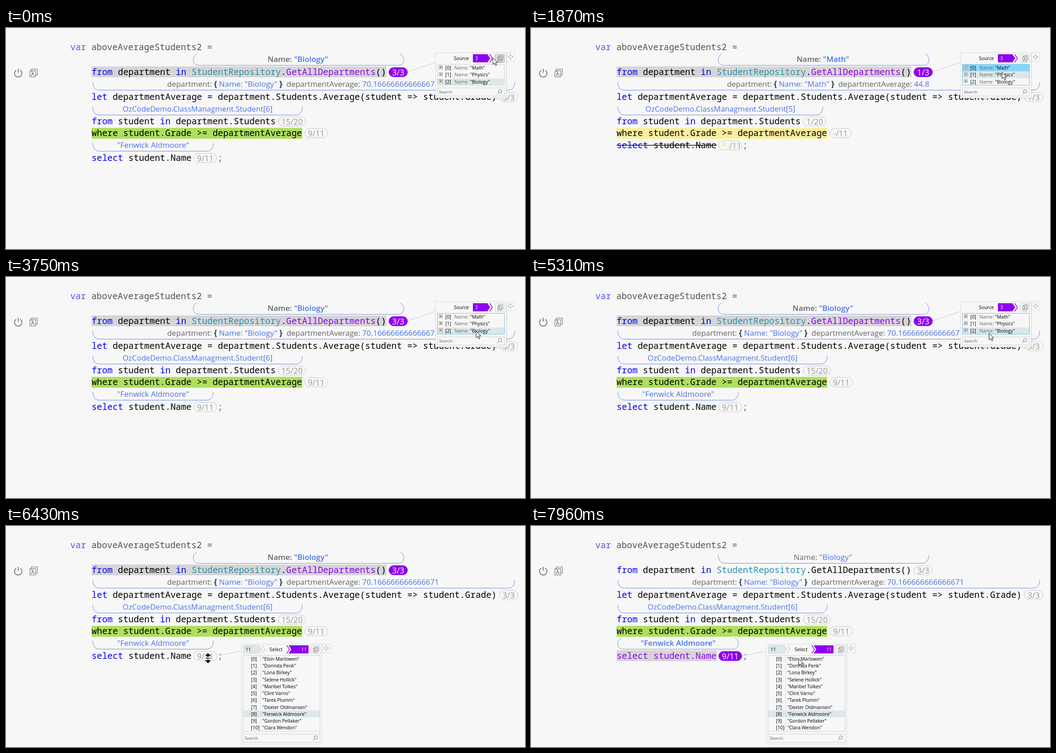
An HTML page that plays this animation: 1146x489 px, repeating every 7.99 s.

```html
<!DOCTYPE html>
<html lang="en">
<head>
<meta charset="utf-8">
<title>Query debugger</title>
<style>
html, body { margin: 0; width: 100%; height: 100%; overflow: hidden; background: #f7f7f7; }
svg { display: block; width: 1146px; height: 489px; }
text { white-space: pre; font-family: "Open Sans", "Noto Sans", sans-serif; }
.code { font: 19.37px "Noto Sans Mono", monospace; fill: #000; }
.strong { font-weight: 700; }
.semi { font-weight: 600; }
.small { font-size: 10.4px; fill: #000; }
.search { font-size: 9.6px; font-style: italic; fill: #666; }
.key { fill: #0000f0; }
.type { fill: #2b91af; }
.dim { fill: #666; }
.value { fill: #4a72ea; }
.brace { fill: #223c48; font-weight: 700; }
.purple { fill: #9000f0; }
.light { fill: #fff; }
</style>
</head>
<body>
<svg viewBox="0 0 1146 489"><g id="query"></g><g id="source"></g><g id="select"></g><g id="pointer"></g></svg>
<script>
const LOOP = 7990, PURPLE = '#9000f0', PALE = '#dde7e9', PAPER = '#f7f7f7';
const DEPARTMENTS = [
  { name: 'Math', average: '44.8', count: 5, student: '1/20', where: '-/11' },
  { name: 'Physics', average: '45.444444444444443', count: 9, student: '6/20', where: '3/11', picked: 'Lona Birkey' },
  { name: 'Biology', average: '70.166666666666671', count: 6, student: '15/20', where: '9/11', picked: 'Fenwick Aldmoore' }
];
const STUDENTS = ['Elsin Marlowen', 'Dorinda Penk', 'Lona Birkey', 'Selene Hollick', 'Maribel Tolkes', 'Clint Varno',
  'Tarek Plumm', 'Dexter Oldmansen', 'Fenwick Aldmoore', 'Gordon Pellaker', 'Clara Wendon'];
// time, x, y
const PATH = [[0, 1075, 66], [30, 1075, 66], [430, 1040, 88], [1720, 1040, 88], [1930, 1040, 100], [2860, 1040, 100],
  [3220, 1038, 120], [5280, 1038, 120], [5500, 850, 152], [5790, 562, 265], [6060, 446, 292], [7630, 446, 292],
  [7960, 591, 294], [LOOP, 591, 294]];

const layer = id => document.getElementById(id);
const clamp = v => Math.max(0, Math.min(1, v));
const step = (t, times) => times.filter(at => t >= at).length;

const span = (s, cls = '') => `<tspan class="${cls}">${s}</tspan>`;
const text = (x, y, body, cls = '', attrs = '') => `<text x="${x}" y="${y}" class="${cls}" ${attrs}>${body}</text>`;
const rect = (x, y, w, h, fill, stroke = 'none', r = 0) =>
  `<rect x="${x}" y="${y}" width="${w}" height="${h}" rx="${r}" fill="${fill}" stroke="${stroke}"/>`;
const path = (d, stroke, fill = 'none', width = 1) =>
  `<path d="${d}" stroke="${stroke}" fill="${fill}" stroke-width="${width}"/>`;
const code = (y, body, cls = '', x = 189) => text(x, y, body, 'code ' + cls);
const label = (x, y, body, cls = 'value', size = 17) => text(x, y, body, cls, `font-size="${size}" text-anchor="middle"`);

function bracket(x1, x2, bottom, active) {
  const y = bottom + .5;
  return active
    ? path(`M${x1 + 8} ${y - 25}Q${x1} ${y - 21} ${x1} ${y - 12}Q${x1} ${y} ${x1 + 13} ${y}H${x2 - 13}
        Q${x2} ${y} ${x2} ${y - 12}Q${x2} ${y - 21} ${x2 - 8} ${y - 25}`, '#7690e0')
    : path(`M${x1} ${y - 18}Q${x1 + 1} ${y} ${x1 + 14} ${y}H${x2 - 14}Q${x2 - 1} ${y} ${x2} ${y - 18}`, '#6384ea');
}

function pill(x, y, w, body, active) {
  return rect(x + .5, y + .5, w - 1, 20.5, active ? PURPLE : PAPER, active ? PURPLE : '#c6c6c6', 10.2) +
    text(x + w / 2, y + 18, body, '', `font-size="17.8" text-anchor="middle" fill="${active ? '#fff' : '#999'}"`);
}

function lambda(x, y, k, color) {
  return `<g transform="translate(${x} ${y}) scale(${k})" fill="none" stroke="${color}" stroke-width="1.3">
    <path d="M4 4V.7H17.3V14H14M.7 4.5H13.5V18.3H.7Z"/>
    <path d="M3.5 6.5H5.5L10.5 16M7.2 9.5L3.5 16" stroke-width="1.7"/></g>`;
}

function drawSelectLine(d, active) {
  const y = d.picked ? 294 : 266;
  const line = code(y, active ? span('select student.Name', 'purple') : span('select', 'key') + ' student.Name') +
    code(y, span(';', 'dim'), '', 467);
  if (!d.picked) {
    return line + pill(414, y - 17, 52, '<tspan dx="11">/11</tspan>') + path('M189 259.5H410', '#111', 'none', 1.4) +
      path('M421.5 258a4 4 0 1 0 8 0a4 4 0 1 0 -8 0M422.7 261L428.3 255', '#f3e37a', 'none', 1.3);
  }
  return bracket(191.5, 458, 272, active) + label(325, 265, `"${d.picked}"`, active ? 'value semi' : 'value') +
    (active ? rect(189, 275, 221, 24, '#d5d5d5') : '') + line + pill(414, y - 17, 52, d.where, active);
}

function drawQuery(s) {
  const d = DEPARTMENTS[s.dept], n = `${s.dept + 1}/3`, top = !s.selectActive;
  const name = span('Name: ', 'dim') + span(`"${d.name}"`, 'value');
  const studentEnd = d.student.length > 4 ? 662 : 652;
  return [
    `<g opacity=".66">${code(49, span('var', 'key') + ' aboveAverageStudents2 =', '', 142)}</g>`,
    path('M22.5 93.5A8.2 8.2 0 1 0 31.5 93.5M27 90V99', '#858585', 'none', 2),
    lambda(52, 90, 1, '#858585'),
    bracket(413.5, 878.5, 82, top),
    label(644.5, 75, name, top ? 'semi' : ''),
    top ? rect(189, 85, 651, 24, '#d5d5d5') : '',
    code(104, span('from', 'key') + ' department ' + span('in', 'key') + ' ' + span('StudentRepository', 'type') + '.' +
      span('GetAllDepartments', top ? 'purple' : '') + '()'),
    pill(845, 87, 42, n, top),
    bracket(191.5, 1123.5, 137),
    label(656, 130, span('department: ', 'dim') + span('{', 'brace') + span(` Name: "${d.name}" `, 'value') +
      span('}', 'brace') + span('  departmentAverage: ', 'dim') + span(d.average, 'value')),
    s.letHover ? rect(189, 140, 895, 24, '#dfe8ea') : '',
    code(159, span('let', 'key') + ' departmentAverage = department.Students.Average(student => student.Grade)',
      s.letHover ? 'strong' : ''),
    pill(1089, 142, 42, n),
    bracket(191.5, studentEnd - 7.5, 192),
    label((studentEnd + 184) / 2, 185, `OzCodeDemo.ClassManagment.Student[${d.count}]`, 'value', 16.65),
    code(213, span('from', 'key') + ' student ' + span('in', 'key') + ' department.Students'),
    pill(601, 196, studentEnd - 601, d.student),
    rect(189, 221, 465, 24, d.picked ? '#aedf5e' : '#fbee9e'),
    code(239, 'where student.Grade >= departmentAverage'),
    pill(659, 222, d.picked ? 52 : 49, d.where),
    drawSelectLine(d, s.selectActive)
  ].join('');
}

const lambdaButton = (x, y, hover) => rect(x + .5, y + .5, 20, 18, hover ? '#ddd' : PAPER, hover ? '#aaa' : '#d2d2d2') +
  lambda(x + 5, y + 3, .7, '#777');

const handle = (x, y) => rect(x + .5, y + .5, 18, 20, PAPER, '#ddd') +
  [0, 90, 180, 270].map(a => `<path d="M0 -5.5L2 -3H-2Z" fill="#888" transform="translate(${x + 9} ${y + 10}) rotate(${a})"/>`).join('');

const searchBox = (x, y, w) => rect(x + .5, y + .5, w, 18, PAPER, '#d2d2d2') + text(x + 4, y + 13, 'Search:', 'search') +
  `<circle cx="${x + w - 9}" cy="${y + 8}" r="3.7" fill="none" stroke="#777"/>` +
  path(`M${x + w - 12} ${y + 11}l-3.5 3.5`, '#777');

const chevron = (x, y, color) => path(`M${x} ${y}l6 9l-6 9`, color, 'none', 1.4);

function drawSource(s) {
  const rows = DEPARTMENTS.map((d, i) => {
    const y = 81 + i * 15.3;
    const fill = s.row === i ? PALE : s.dept !== i ? 'none' : s.focus ? '#87d5f7' : PALE;
    return rect(953, y, 148, 15, fill) + rect(956.5, y + 2.5, 7, 7, '#fff', '#888') +
      path(`M958 ${y + 6}h4m-2 -2v4`, '#222') + text(970, y + 11, `[${i}]`, 'small') +
      text(990, y + 11, span('Name: ', 'dim') + `"${d.name}"`, 'small');
  }).join('');
  return path('M887 97L948 76', '#c8c8c8') + rect(950, 57, 157, 101, 'rgba(0,0,0,.04)') +
    rect(948.5, 54.5, 156, 100, PAPER, '#dcdcdc') + (s.handle ? handle(1105, 54) : '') +
    text(989, 71, 'Source', 'small') + path('M1031 58H1063L1069 67L1063 76H1031Z', 'none', PURPLE) +
    chevron(1068, 58, PURPLE) + text(1036, 71, '3', 'small light') + lambdaButton(1080, 58, s.buttonHover) +
    rows + path('M986.5 81V127', '#dce8ec') +
    rect(952.5, 80.5, 148, 46, 'none', s.focus ? '#68c4ec' : '#d2d2d2') + searchBox(952, 132, 148);
}

function drawSelect() {
  const rows = STUDENTS.map((name, i) => {
    const y = 298 + i * 15.24;
    return (i === 8 ? rect(524, y - 12, 169, 15.2, PALE) : '') +
      text(541, y, `[${i}]`, 'small') + text(566, y, `"${name}"`, 'small');
  }).join('');
  return path('M467 287L519 277', '#c8c8c8') + rect(519.5, 261.5, 178, 221, PAPER, '#dcdcdc') + handle(698, 260) +
    path('M524.5 264.5H559L565 273L559 281.5H524.5Z', '#c6d0d2', PALE) + chevron(566, 264, '#ccd5d7') +
    text(529, 277, '11', 'small') + text(582, 277, 'Select', 'small') +
    chevron(620, 264, PURPLE) + path('M624 264H668V282H624L630 273Z', 'none', PURPLE) +
    text(652, 277, '11', 'small light') + lambdaButton(673, 264) +
    rect(523.5, 286.5, 170, 168, PAPER, '#d2d2d2') + rows + path('M562.5 287V454', '#c3e6f0') + searchBox(523, 460, 170);
}

const POINTERS = {
  arrow: path('M0 0V14.5L3.5 11.4L6 17L8.4 16L6 10.5H10.5Z', '#111', '#fff'),
  beam: path('M-3.5 -6.5H-1L0 -5.5L1 -6.5H3.5M0 -5.5V5.5M-3.5 6.5H-1L0 5.5L1 6.5H3.5', '#222', 'none', 1.2),
  resize: path('M0 -11L7 -4H1.5V-2H-1.5V-4H-7ZM0 12L7 5H1.5V3H-1.5V5H-7Z', '#fff', '#000', .5) +
    path('M-5 .5H5', '#000', 'none', 1.4)
};

function position(t) {
  const i = Math.max(1, PATH.findIndex(p => p[0] > t)), a = PATH[i - 1], b = PATH[i];
  let k = clamp((t - a[0]) / (b[0] - a[0]));
  if (a[0] < 5280 || a[0] > 6060) k = k * k * (3 - 2 * k);
  return [a[1] + (b[1] - a[1]) * k, a[2] + (b[2] - a[2]) * k];
}

const drawn = {};
function update(id, state, draw) {
  const key = JSON.stringify(state);
  if (drawn[id] === key) return;
  drawn[id] = key;
  layer(id).innerHTML = draw(state);
}

function render(t) {
  const dept = [2, 0, 1, 2][step(t, [830, 2530, 3750])];
  update('query', { dept, letHover: t >= 5430 && t < 5850, selectActive: t >= 6630 }, drawQuery);
  update('source', {
    dept, row: [-1, 0, 1, 2, -1][step(t, [220, 1830, 3040, 5370])],
    focus: t >= 830, handle: t < 5400, buttonHover: t < 90
  }, drawSource);
  update('select', {}, drawSelect);
  layer('source').setAttribute('opacity', 1 - clamp((t - 6090) / 200));
  layer('select').setAttribute('opacity', clamp((t - 6090) / 340));
  const shape = ['arrow', 'beam', 'resize', 'arrow'][step(t, [5390, 6030, 7660])];
  update('pointer', shape, name => POINTERS[name]);
  layer('pointer').setAttribute('transform', `translate(${position(t)})`);
}

const start = performance.now();
function tick() {
  render((performance.now() - start) % LOOP);
  requestAnimationFrame(tick);
}
tick();
</script>
</body>
</html>
```
